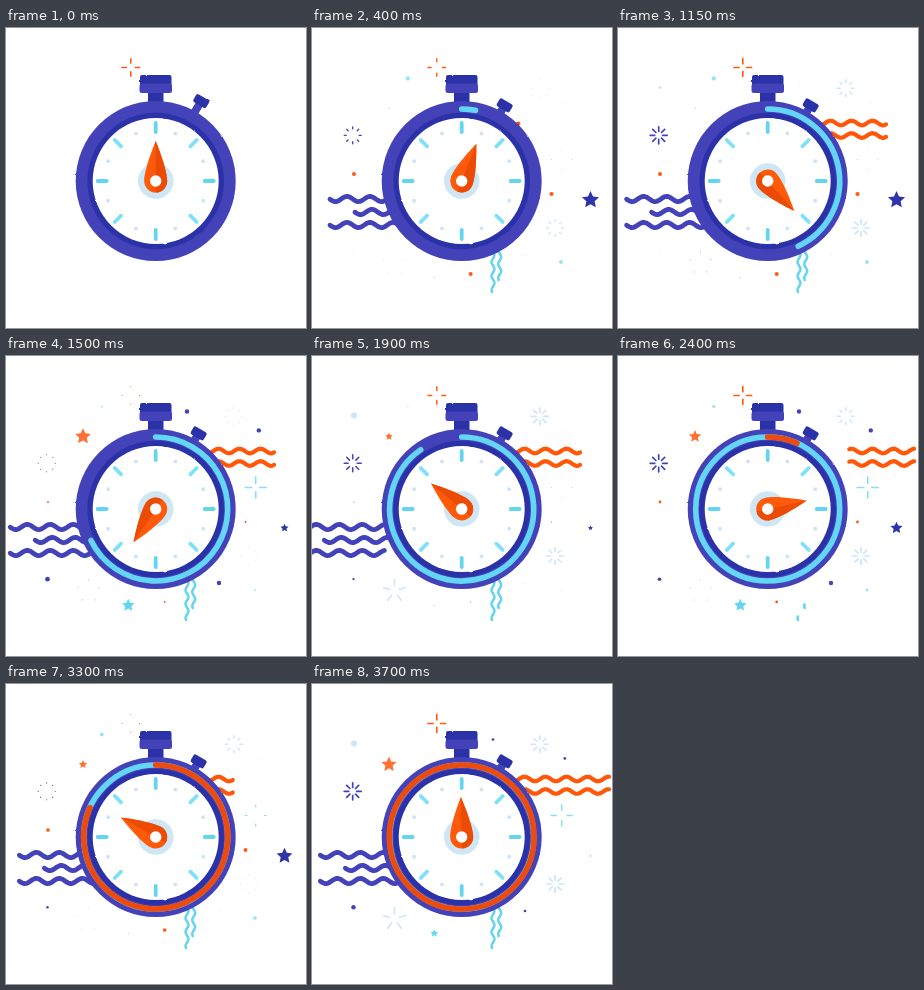
An HTML page that plays this animation: 300 px wide and 300 px high, repeating every 3750 ms.

```html
<!DOCTYPE html>
<html lang="en">
<head>
<meta charset="utf-8">
<title>Stopwatch</title>
<style>
html, body { margin: 0; width: 100%; height: 100%; overflow: hidden; background: #fff; }
svg { display: block; width: 100vw; height: 100vh; }
</style>
</head>
<body>
<svg viewBox="0 0 300 300" fill="none" stroke-linecap="round" stroke-linejoin="round">
  <defs>
    <filter id="rough" x="-5%" y="-5%" width="110%" height="110%" color-interpolation-filters="sRGB">
      <feTurbulence type="fractalNoise" baseFrequency="0.16" numOctaves="1" seed="4"/>
      <feDisplacementMap in="SourceGraphic" scale="2" xChannelSelector="R" yChannelSelector="G"/>
    </filter>
  </defs>
  <g id="sparks"></g>
  <g id="waves"></g>
  <g filter="url(#rough)">
    <rect x="142" y="62" width="15.5" height="16" fill="#2b32a8"/>
    <rect x="134" y="47" width="31.5" height="12" rx="2" fill="#2b32a8"/>
    <rect x="133.5" y="55.5" width="32.5" height="9.5" rx="2.5" fill="#4442b8"/>
    <g id="button">
      <rect x="-4" y="2" width="8" height="11" fill="#4442b8"/>
      <rect x="-7.5" y="-5" width="15" height="9" rx="2" fill="#2b32a8"/>
    </g>
    <circle cx="149.7" cy="153" r="80" fill="#4442b8"/>
    <circle cx="149.7" cy="153" r="68.3" fill="#2b32a8"/>
    <circle cx="149.7" cy="153" r="63" fill="#fff"/>
  </g>
  <g transform="translate(149.7 153)">
    <path id="arcCyan" stroke="#63d5f5" stroke-width="5.6"/>
    <path id="arcOrange" stroke="#ee4a0c" stroke-width="5.6"/>
    <g id="ticks"></g>
    <circle r="17.8" fill="#cfe7f5"/>
    <g id="needle">
      <path d="M0-40C2.5-34 11.5-11 11.5 0A11.5 11.5 0 0 1-11.5 0C-11.5-11-2.5-34 0-40Z" fill="#ff5a0a"/>
      <path d="M0-40C2.5-34 11.5-11 11.5 0A11.5 11.5 0 0 1 0 11.5Z" fill="#ec4b05"/>
      <circle r="5.7" fill="#fff"/>
    </g>
  </g>
</svg>
<script>
const LOOP = 3750, TAU = Math.PI * 2;
const NAVY = '#2f35a9', PURPLE = '#4442b8', ORANGE = '#ff5a14', CYAN = '#63d5f0', PALE = '#cfe5f6', SKY = '#9de3f4';
const $ = id => document.getElementById(id);
const clamp = v => Math.max(0, Math.min(1, v));
const ramp = (t, a, b) => clamp((t - a) / (b - a));
const swing = u => (1 - Math.cos(Math.PI * u)) / 2;
const easeOut = u => 1 - (1 - u) ** 3;

// cubic-bezier(x1, 0, x2, 1)
function bezier(x1, x2, x) {
  let lo = 0, hi = 1;
  for (let i = 0; i < 24; i++) {
    const s = (lo + hi) / 2, r = 1 - s;
    if (3 * r * r * s * x1 + 3 * r * s * s * x2 + s ** 3 < x) lo = s; else hi = s;
  }
  return lo * lo * (3 - 2 * lo);
}

function add(parent, tag, attrs) {
  const el = document.createElementNS('http://www.w3.org/2000/svg', tag);
  for (const k in attrs) el.setAttribute(k, attrs[k]);
  return parent.appendChild(el);
}

// point at radius r, a = turns clockwise from the top
const pt = (r, a) => [r * Math.sin(a * TAU), -r * Math.cos(a * TAU)].map(v => v.toFixed(2)).join(' ');

for (let i = 0; i < 16; i++) {
  const dot = i % 2, a = i / 16;
  add($('ticks'), 'path', {
    d: dot ? `M${pt(51.5, a)}l0 .01` : `M${pt(49, a)}L${pt(58, a)}`,
    stroke: dot ? PALE : i % 4 ? '#80e0f7' : '#63d5ee',
    'stroke-width': dot ? 4 : 3.8
  });
}

// twinkles run n cycles per loop and are largest at phase peak
const wave = (t, n, peak) => Math.cos((t / LOOP * n - peak) * TAU);
const grow = t => ramp(t, 25, 250);

function burst(x, y, arms, r1, r2, color, n, peak, always) {
  const el = add($('sparks'), 'path', { transform: `translate(${x} ${y})`, stroke: color });
  return t => {
    const g = always ? 1 : grow(t), v = 0.5 + 0.5 * wave(t, n, peak);
    const inner = r2 - (r2 - r1) * clamp(v * 1.25 - 0.15) * g;
    let d = '';
    for (let k = 0; k < arms; k++) d += `M${pt(inner - 0.05, k / arms)}L${pt(r2, k / arms)}`;
    el.setAttribute('d', d);
    el.setAttribute('stroke-width', (1 + 0.7 * v) * g);
  };
}

const starPath = Array.from({ length: 10 }, (_, i) =>
  (i ? 'L' : 'M') + pt(i % 2 ? 0.48 : 1, i / 10)).join('') + 'Z';

// stars and dots that share one rhythm: [x, y, radius, colour, isStar]
function cluster(n, peak, bias, items) {
  const els = items.map(([x, y, r, color, star]) => ({
    x, y, r, el: add($('sparks'), star ? 'path' : 'circle', star ? { d: starPath, fill: color } : { r: 1, fill: color })
  }));
  return t => {
    const size = (0.08 + 0.92 * clamp(bias + wave(t, n, peak))) * grow(t);
    for (const { x, y, r, el } of els) el.setAttribute('transform', `translate(${x} ${y}) scale(${r * size})`);
  };
}

// wavy line between two distances, with a crest at the given one
function ripple(el, from, to, crest, mid, amp, len, upright) {
  let d = '';
  const n = Math.ceil((to - from) / 1.5);
  for (let i = 0; i <= n && to - from > 0.5; i++) {
    const s = from + (to - from) * i / n;
    const w = mid - amp * Math.cos((s - crest) / len * TAU);
    d += (i ? 'L' : 'M') + (upright ? [w, s] : [s, w]).map(v => v.toFixed(2)).join(' ');
  }
  el.setAttribute('d', d);
}
const line = (color, width) => add($('waves'), 'path', { stroke: color, 'stroke-width': width });

// side waves shoot out, linger and leave; then again
const AGAIN = 2530;

function leftWave(y, inset) {
  const el = line(PURPLE, 4.8);
  return t => {
    const age = t % AGAIN;
    const x = 95 - 72 * easeOut(ramp(age, 0, 370)) - 0.0125 * age - 125 * ramp(age, 1700, 2350) ** 2 + inset;
    ripple(el, x, Math.min(95, x + 85), x + 17, y, 2.6, 23);
  };
}

function rightWave(y) {
  const el = line('#ff5608', 4.2);
  return t => {
    const first = t < 3180;
    const head = first ? 200 + 68 * ramp(t, 330, 1100) + 28 * ramp(t, 1950, 2400) : 200 + 97 * ramp(t, 3180, 3620);
    const tail = first ? 200 + 97 * ramp(t, 2030, 3180) : 200;
    ripple(el, tail, head, 296.5, y, 2.3, 21);
  };
}

function downWave(x, inset) {
  const el = line(CYAN, 2.5);
  return t => {
    const age = t % AGAIN;
    const head = 222 + 42 * easeOut(ramp(age, 0, 400)) - inset;
    const tail = 222 + 46 * ramp(age, 2050, 2470) - inset;
    ripple(el, tail, head, 262 - inset, x, 1.5, 14, true);
  };
}

const parts = [
  burst(124.8, 39.5, 4, 3.8, 8.8, ORANGE, 6, 0.86, true),
  burst(227.8, 60.3, 8, 4, 8.5, PALE, 6, 0.05),
  burst(40.7, 107.3, 8, 4, 8.5, PURPLE, 6, 0.9),
  burst(243, 200, 8, 4, 8.5, PALE, 6, 0.9),
  burst(249.7, 131.5, 4, 4, 10.5, '#85e1f3', 5, 0.1),
  burst(82.5, 235, 5, 5, 11.5, PALE, 4, 0.92),
  cluster(4, 0.77, 0.45, [
    [77, 80.5, 8.8, '#ff7034', true],
    [41.5, 223.2, 2.5, PURPLE]
  ]),
  cluster(4, 0.33, 0.55, [
    [278.5, 172, 9, NAVY, true],
    [42, 146, 2, ORANGE],
    [239.5, 166, 2.1, ORANGE],
    [158.7, 246, 2, ORANGE],
    [95.8, 50.4, 2.2, SKY],
    [249, 234, 2, SKY]
  ]),
  cluster(5, 0.1, -0.1, [
    [122.3, 249.3, 9, CYAN, true],
    [181, 55.5, 3, PURPLE],
    [252.8, 74.4, 3, PURPLE],
    [213, 227, 3, PURPLE]
  ]),
  cluster(4, 0.01, 0.3, [[42, 59.5, 3, PALE]]),
  leftWave(171, 0), leftWave(184, 25), leftWave(197, 0),
  rightWave(95), rightWave(107.5),
  downWave(181, 0), downWave(187.7, 12)
];

function setArc(el, part) {
  const r = 72;
  el.setAttribute('d', part < 0.001 ? '' :
    `M${pt(r, 0)}A${r} ${r} 0 0 1 ${pt(r, part / 2)}A${r} ${r} 0 0 1 ${pt(r, part)}`);
}

function draw(t) {
  parts.forEach(f => f(t));
  setArc($('arcCyan'), swing(ramp(t, 156, 2340)));
  setArc($('arcOrange'), swing(ramp(t, 2130, 3760)));
  $('needle').setAttribute('transform', `rotate(${720 * bezier(0.33, 0.83, t / LOOP)})`);
  $('button').setAttribute('transform', `translate(195 73.5) rotate(31) translate(0 ${5 * ramp(t, 0, 100)})`);
}

const start = performance.now();
function frame() {
  draw((performance.now() - start) % LOOP);
  requestAnimationFrame(frame);
}
draw(0);
requestAnimationFrame(frame);
</script>
</body>
</html>
```
